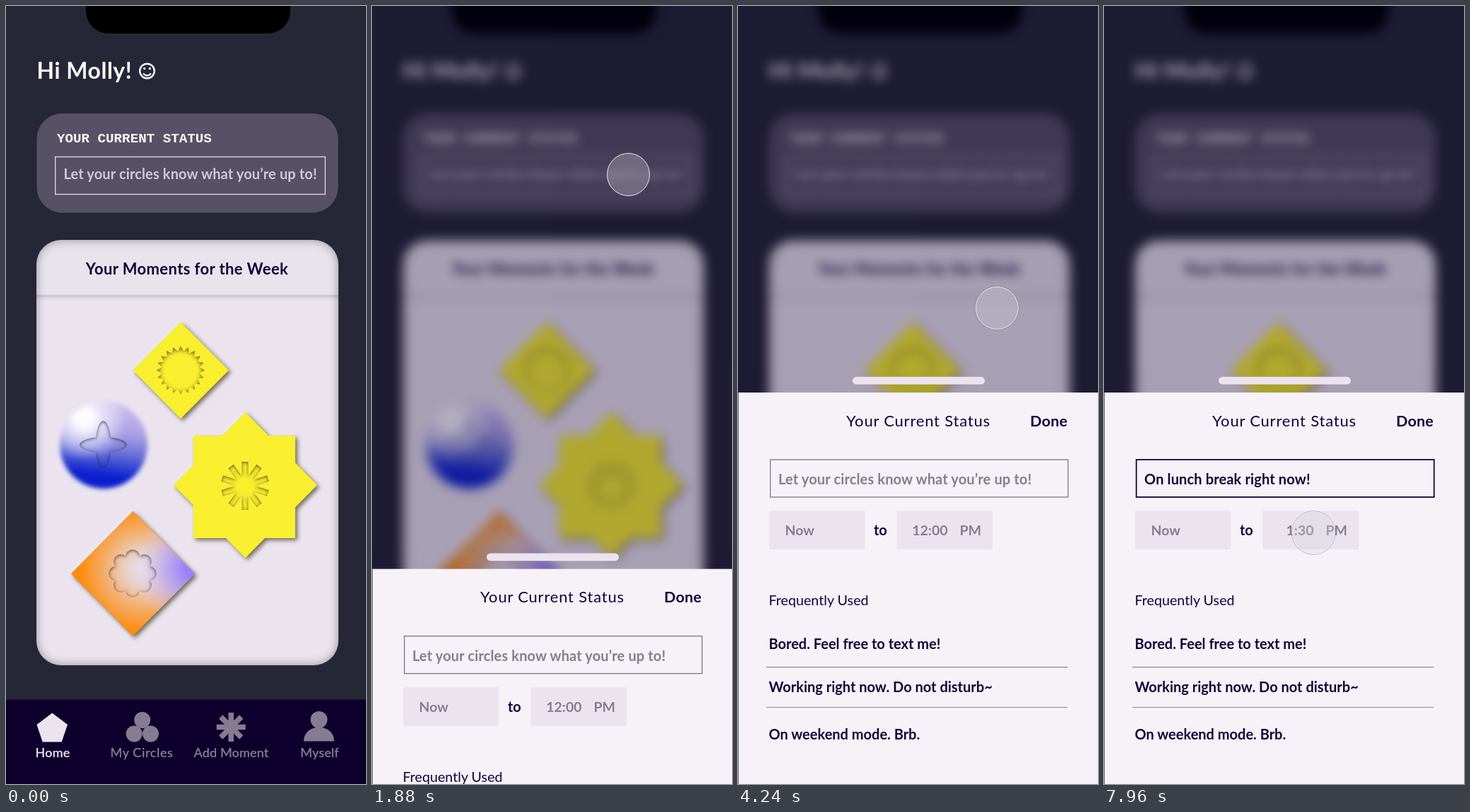
Recreate the animation shown at these times as an HTML page. Size 509 px wide and 1101 px high, loop 8000 ms.

```html
<!DOCTYPE html>
<html lang="en">
<head>
<meta charset="utf-8">
<title>Status update</title>
<style>
html, body { margin: 0; width: 100%; height: 100%; overflow: hidden; background: #262736; }
body { position: relative; }
svg { position: absolute; left: 0; top: 0; overflow: visible; }
#home { position: absolute; left: 0; top: 0; width: 509px; height: 1101px; }
#home.away { filter: blur(7.5px); }
#dim { position: absolute; inset: 0; background: rgba(13, 1, 48, .3); }
#card {
  position: absolute; left: 43px; top: 331px; width: 426.5px; height: 602px; border-radius: 35px;
  background: linear-gradient(#e7e4ec 77px, #c4c1d0 79px, #dcd7e3 82px, #ebe4ee 86px);
  box-shadow: inset 0 0 13px rgba(55, 50, 60, .48);
}
text { font: 700 20px Lato, "Open Sans", sans-serif; fill: #12053a; }
.mono { font: 700 19.2px "Liberation Mono", monospace; }
.thin { font-weight: 400; }
.wide { letter-spacing: .14px; }
.nav text {
  font-size: 18px; font-weight: 500; text-anchor: middle; letter-spacing: .15px;
  fill: #877b91; stroke: #877b91; stroke-width: .25px;
}
.nav .on { fill: #ebe4ee; stroke: #ebe4ee; }
.soft text { fill: #867d91; font-size: 19.5px; }
.cut { filter: url(#inset); }
.lift { filter: url(#drop); }
</style>
</head>
<body>
<div id="home">
  <div id="card"></div>
  <svg width="509" height="1101">
    <defs>
      <filter id="inset" x="-20%" y="-20%" width="140%" height="140%" color-interpolation-filters="sRGB">
        <feFlood flood-color="#1c1610" flood-opacity=".72"/>
        <feComposite in2="SourceAlpha" operator="out"/>
        <feGaussianBlur stdDeviation="2.6"/>
        <feOffset dx=".4" dy="1"/>
        <feComposite in2="SourceAlpha" operator="in"/>
      </filter>
      <filter id="drop" x="-20%" y="-20%" width="140%" height="140%" color-interpolation-filters="sRGB">
        <feDropShadow dx="-2" dy="-2" stdDeviation="2" flood-color="#fff" flood-opacity=".35" result="lit"/>
        <feDropShadow in="SourceGraphic" dx="3" dy="3" stdDeviation="3" flood-color="#453d28" flood-opacity=".75"/>
        <feComposite in2="lit" operator="over"/>
      </filter>
      <filter id="fuzz" x="-20%" y="-20%" width="140%" height="140%" color-interpolation-filters="sRGB">
        <feGaussianBlur stdDeviation="3"/>
      </filter>
      <linearGradient id="sky" x1=".58" y1="0" x2=".46" y2="1">
        <stop stop-color="#cdbfee"/><stop offset=".35" stop-color="#a9a0e4"/>
        <stop offset=".55" stop-color="#7279da"/><stop offset=".85" stop-color="#0a20cf"/>
      </linearGradient>
      <radialGradient id="shine" cx=".28" cy=".2" r=".48">
        <stop offset=".2" stop-color="#fcfbff"/><stop offset=".5" stop-color="#f0eefc" stop-opacity=".7"/>
        <stop offset="1" stop-color="#fff" stop-opacity="0"/>
      </radialGradient>
      <radialGradient id="fire" gradientUnits="userSpaceOnUse" cx="194" cy="797" r="94">
        <stop stop-color="#e7e2f0"/><stop offset=".28" stop-color="#e9cfc4"/>
        <stop offset=".58" stop-color="#f3ae6c"/><stop offset=".95" stop-color="#ff8c0c"/>
      </radialGradient>
      <radialGradient id="dusk" gradientUnits="userSpaceOnUse" cx="268" cy="796" r="88">
        <stop offset=".15" stop-color="#9781ff"/><stop offset=".5" stop-color="#b9a9f6" stop-opacity=".85"/>
        <stop offset="1" stop-color="#e0d6f0" stop-opacity="0"/>
      </radialGradient>
    </defs>

    <rect x="113" y="-60" width="289" height="99" rx="32"/>
    <text x="43.5" y="103" style="font-size:32px;fill:#fbf7fd;letter-spacing:.5px">Hi Molly!</text>
    <g fill="none" stroke="#fbf7fd" stroke-width="2.4">
      <circle cx="199.5" cy="92" r="10.3"/>
      <path d="M194 95.5Q199.5 101.5 205 95.5"/>
      <path d="M195.7 87v3M203.3 87v3" stroke-width="2.8"/>
    </g>

    <rect x="43.5" y="152" width="426" height="140.5" rx="36" fill="#565165"/>
    <text class="mono" x="72" y="192.5" style="fill:#fbf7fd">YOUR CURRENT STATUS</text>
    <rect x="69.7" y="213.5" width="381.6" height="53" fill="none" stroke="#d9d2e0" stroke-width="1.4"/>
    <text class="wide" x="81.5" y="244.5" style="fill:#d3c8dc">Let your circles know what you’re up to!</text>
    <text x="256" y="379.5" text-anchor="middle" style="font-size:22px;letter-spacing:.4px">Your Moments for the Week</text>

    <path class="lift" d="M247 447.5 315 515.5 247 584 179.5 515.5Z" fill="#f9ef2f"/>
    <path class="cut" id="sun"/>

    <g filter="url(#fuzz)">
      <circle cx="138" cy="621" r="62" fill="url(#sky)"/>
      <circle cx="138" cy="621" r="62" fill="url(#shine)"/>
    </g>
    <g class="cut">
      <ellipse cx="137.5" cy="621" rx="33.5" ry="11"/>
      <ellipse cx="137.5" cy="621" rx="11" ry="34"/>
    </g>

    <g class="lift" fill="#f9ef2f">
      <path d="M338.5 575 440 678 338.5 781 237 678Z"/>
      <path d="M265 608H409V753H265Z"/>
    </g>
    <path class="cut" id="burst" stroke="#000" stroke-width="9"/>

    <g class="lift">
      <path d="M179.5 715 267 803.5 179.5 891.5 92 803.5Z" fill="url(#fire)"/>
      <path d="M179.5 715 267 803.5 179.5 891.5 92 803.5Z" fill="url(#dusk)"/>
    </g>
    <g class="cut" id="flower"><circle cx="179" cy="803" r="24"/></g>

    <g class="nav" fill="#877b91">
      <rect x="-40" y="981.5" width="589" height="180" fill="#0d002d"/>
      <path d="M65.3 1000.5 87 1017 78.7 1041.5H51.7L43.5 1017Z" fill="#ebe4ee"/>
      <circle cx="192.7" cy="1010.5" r="11.5"/>
      <circle cx="181.2" cy="1030" r="11.5"/>
      <circle cx="204.5" cy="1030" r="11.5"/>
      <path id="star" stroke="#877b91" stroke-width="7.5"/>
      <circle cx="442.5" cy="1010" r="12"/>
      <path d="M421 1040.5C421 1014 464 1014 464 1040.5Z"/>
      <text class="on" x="66" y="1063">Home</text>
      <text x="192" y="1063" style="letter-spacing:.6px">My Circles</text>
      <text x="318.5" y="1063">Add Moment</text>
      <text x="443.5" y="1063">Myself</text>
    </g>
  </svg>
</div>
<div id="dim"></div>
<svg width="509" height="1101">
  <g id="sheet">
    <rect x="162" y="524.8" width="187" height="10.8" rx="5.4" fill="#ebe4ee"/>
    <rect y="547" width="509" height="600" fill="#f6f2f8"/>
    <path d="M.5 547V1150" stroke="#6c647c"/>
    <text class="thin" x="153" y="594.5" style="font-size:22px;letter-spacing:.8px">Your Current Status</text>
    <text x="413" y="594.5" style="font-size:21.5px;letter-spacing:.2px">Done</text>
    <rect id="field" x="45.7" y="642" width="421" height="53" fill="none"/>
    <text class="wide" id="status" x="57" y="677"></text>
    <path d="M44 714.5H179.5V769H44ZM224.5 714.5H360V769H224.5Z" fill="#ebe4ee"/>
    <g class="soft">
      <text x="66.5" y="749">Now</text>
      <text id="until" x="296.5" y="749" text-anchor="end"></text>
      <text x="313.5" y="749">PM</text>
    </g>
    <text x="192" y="749">to</text>
    <text class="thin" x="43.5" y="848" style="font-size:19.7px">Frequently Used</text>
    <text x="43.5" y="910">Bored. Feel free to text me!</text>
    <text x="43.5" y="971">Working right now. Do not disturb~</text>
    <text x="43.5" y="1037.5">On weekend mode. Brb.</text>
    <path d="M40 935.7H466M40 992.5H466" stroke="#8b8594" stroke-width="1.2"/>
  </g>
  <g id="touch">
    <circle id="pad" r="30" fill="#d2d2d6" stroke="#f0eef4"/>
    <circle id="rim" r="30.9" fill="none" stroke="#5a5564" stroke-opacity=".4" stroke-width=".8"/>
  </g>
</svg>
<script>
const $ = id => document.getElementById(id);
const set = (el, attrs) => { for (const k in attrs) el.setAttribute(k, attrs[k]); };
const clamp = v => Math.min(1, Math.max(0, v));
const polar = (x, y, r, turn) => {
  const a = (turn - .25) * 2 * Math.PI;
  return [x + r * Math.cos(a), y + r * Math.sin(a)];
};
const ring = (n, f) => Array.from({ length: n }, (_, i) => f(i / n, i));
const rays = (n, x, y, r) => ring(n, u => `M${x} ${y}L${polar(x, y, r, u)}`).join('');

set($('sun'), { d: 'M' + ring(40, (u, i) => polar(247, 515.5, i % 2 ? 27 : 34, u)).join('L') + 'Z' });
set($('burst'), { d: rays(10, 338, 679, 34) });
set($('star'), { d: rays(8, 318.2, 1020.5, 20.5) });
ring(8, u => {
  const [cx, cy] = polar(179, 803, 23.5, u);
  const petal = document.createElementNS('http://www.w3.org/2000/svg', 'circle');
  set(petal, { cx, cy, r: 10.3 });
  $('flower').append(petal);
});

const linear = p => p;
const smooth = p => p * p * (3 - 2 * p);
const early = p => smooth(p ** .74);
const out = p => 1 - (1 - p) ** 2;

// start, end, from x y, to x y, sideways bend, easing
const moves = [
  [600, 1440, 406, -31, 363.5, 229, 0, smooth],
  [1440, 1560, 363.5, 229, 362.5, 238.5, 0, linear],
  [2560, 2680, 362.5, 238.5, 361, 222, 0, linear],
  [3920, 4760, 361, 222, 319, 646, 51, early],
  [4760, 5200, 319, 646, 312, 664, 0, smooth],
  [6640, 7480, 312, 664, 296.3, 745.5, 0, out]
];
const taps = [[1560, 1800], [5440, 5600], [7520, 7880]];

function touchAt(t) {
  const [a, b, x0, y0, x1, y1, bend, ease] = moves.filter(m => m[0] <= t).pop() || moves[0];
  const e = ease(clamp((t - a) / (b - a)));
  return [x0 + (x1 - x0) * e + 2 * bend * e * (1 - e), y0 + (y1 - y0) * e];
}

function draw(now) {
  const t = Math.floor(now % 8000 / 40) * 40;
  const open = t >= 1800, typed = t >= 5600;

  $('home').className = open ? 'away' : '';
  $('dim').style.display = $('sheet').style.display = open ? '' : 'none';
  const left = (1 - clamp((t - 1780) / 380)) ** 2.61;
  set($('sheet'), { transform: `translate(0 ${554 * left})` });

  $('status').textContent = typed ? 'On lunch break right now!' : 'Let your circles know what you’re up to!';
  $('status').style.fill = typed ? '#12053a' : '#867d91';
  set($('field'), { stroke: typed ? '#12053a' : '#7d7788', 'stroke-width': typed ? 1.8 : 1.3 });
  $('until').textContent = t >= 7880 ? '1:30' : '12:00';

  const press = Math.max(...taps.map(([a, b]) => Math.min(clamp((t - a) / 40), clamp((b + 80 - t) / 80))));
  set($('touch'), { transform: `translate(${touchAt(t)})` });
  set($('pad'), { r: 30 - 1.7 * press, 'fill-opacity': .3 + .45 * press });
  set($('rim'), { r: 30.9 - 1.7 * press });
}

function loop() {
  draw(performance.now());
  requestAnimationFrame(loop);
}
loop();
</script>
</body>
</html>
```
